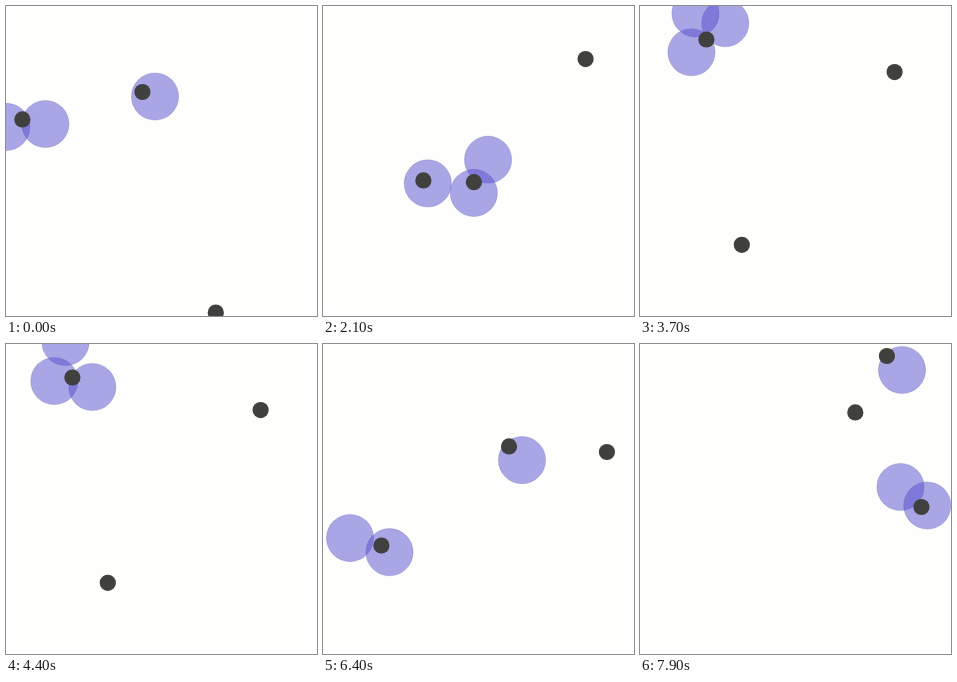
An HTML page with a canvas that plays this animation: 311x310 px, repeating every 8 s.

```html
<!DOCTYPE html>
<html lang="en">
<head>
<meta charset="utf-8">
<title>Agents and landmarks</title>
<style>
  html, body { margin: 0; width: 100%; height: 100%; overflow: hidden; background: #fff; }
  canvas { display: block; }
</style>
</head>
<body>
<canvas id="stage" width="311" height="310"></canvas>
<script>
const ctx = document.getElementById('stage').getContext('2d');
const W = 311, H = 310;
const LOOP = 8000, STEP = 100, EPISODE = 2200, FIRST_RESET = 100;
const AGENT_R = 23.6, SPOT_R = 8.1;

// An agent reaches an offset from its landmark, then swings to a second one.
// Without a second offset it keeps circling slowly.
const agent = (spot, from, to = turn(from, 0.5)) => ({ spot, from, to });

function turn([x, y], a) {
  const c = Math.cos(a), s = Math.sin(a);
  return [x * c - y * s, x * s + y * c];
}

// arrive and end are ages within the episode
const episodes = [
  { arrive: 0, end: EPISODE,
    spots: [[136.4, 86], [16.4, 113.4], [209.8, 306.5]],
    agents: [agent(1, [-16, 7.5]), agent(1, [23, 4.6]), agent(0, [12.6, 4.5])] },
  { arrive: 1000, end: EPISODE,
    spots: [[100.4, 174.4], [150.9, 176.2], [262.6, 53.1]],
    agents: [agent(0, [5.3, 0.7]), agent(1, [2.6, -26.7]), agent(1, [4.8, 9.7])] },
  { arrive: 600, end: 2100,
    spots: [[66.4, 33.5], [254.6, 66.1], [101.8, 238.8]],
    agents: [agent(0, [17.6, -48], [19.9, 9.5]),
             agent(0, [-11.1, 24], [-18.1, 3.5]),
             agent(0, [-15.9, -14.7], [-6.9, -35.5])] },
  { arrive: 1000, end: EPISODE,
    spots: [[186, 102.4], [283.9, 108], [58.4, 201.5]],
    agents: [agent(2, [-32.2, 6.2]), agent(2, [10.3, 2.8]), agent(0, [17.8, 7.3])] },
  { arrive: 500, end: 1200,
    spots: [[246.9, 12], [215.3, 68.4], [281.4, 163]],
    agents: [agent(0, [9.1, 4], [15.1, 14]),
             agent(2, [-4.1, -3], [-20.9, -20]),
             agent(2, [3.6, 37.2], [5.9, -1.5])] }
];

const mix = (a, b, k) => a.map((v, i) => v + (b[i] - v) * k);
const clamp = u => Math.min(1, Math.max(0, u));
const smooth = u => u * u * (3 - 2 * u);
const settle = u => 1 - (1 - u) ** 2;

function random(seed) {
  const v = Math.sin(seed * 12.9898) * 43758.5453;
  return v - Math.floor(v);
}

function birth(seed) {
  const inside = (size, s) => AGENT_R + random(s) * (size - 2 * AGENT_R);
  return [inside(W, seed), inside(H, seed + 0.5)];
}

function place({ spot, from, to }, { spots, arrive, end }, age, seed) {
  const around = ([x, y]) => [spots[spot][0] + x, spots[spot][1] + y];
  if (age < arrive) return mix(birth(seed), around(from), settle(age / arrive));
  return around(mix(from, to, smooth(clamp((age - arrive) / (end - arrive)))));
}

function disc([x, y], r, fill) {
  ctx.beginPath();
  ctx.arc(x, y, r, 0, Math.PI * 2);
  ctx.fillStyle = fill;
  ctx.fill();
}

function draw(t) {
  ctx.fillStyle = '#fff';
  ctx.fillRect(0, 0, W, H);
  ctx.fillStyle = '#fefefc';
  ctx.fillRect(0, 0, 308, 304);

  const n = Math.floor((t - FIRST_RESET) / EPISODE) + 1;
  const age = n ? (t - FIRST_RESET) % EPISODE : 0;
  const episode = episodes[n];

  ctx.strokeStyle = 'rgba(60, 50, 150, 0.25)';
  ctx.lineWidth = 0.8;
  episode.agents.forEach((a, i) => {
    disc(place(a, episode, age, n * 3 + i), AGENT_R, 'rgba(86, 80, 208, 0.5)');
    ctx.stroke();
  });
  for (const spot of episode.spots) disc(spot, SPOT_R, '#40403f');
}

const start = performance.now();
function tick() {
  const t = Math.max(0, performance.now() - start) % LOOP;
  draw(Math.floor(t / STEP) * STEP);
  requestAnimationFrame(tick);
}
tick();
</script>
</body>
</html>
```
